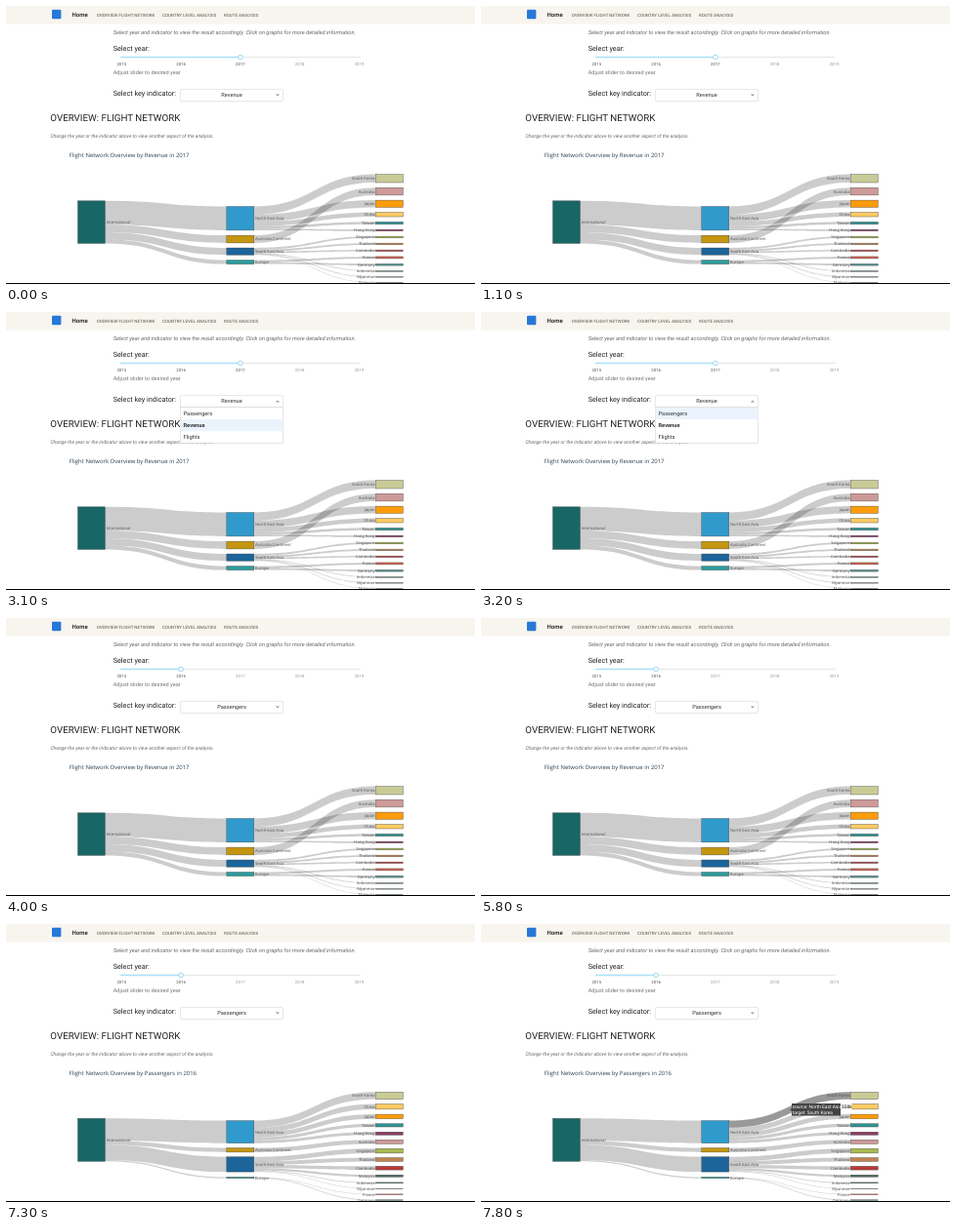
Write an HTML page that moves like this. It is 480x285 px and loops after 8000 ms.

```html
<!DOCTYPE html>
<html lang="en">
<head>
<meta charset="utf-8">
<title>Flight network</title>
<style>
  html, body { margin: 0; width: 100%; height: 100%; overflow: hidden; background: #fff; }
  svg { display: block; width: 100%; height: 100%; }
  text { font-family: Roboto, sans-serif; fill: #3a3a3a; text-rendering: geometricPrecision; white-space: pre; }
  .nav { font-size: 4.45px; font-weight: 500; fill: #77736c; }
  .head { font-size: 7.25px; fill: #222; }
  .note { font-style: italic; fill: #666; }
  .pick { font-size: 5.68px; fill: #333; }
  .year { font-size: 4.3px; text-anchor: middle; }
  .chart text { font-family: "Open Sans", sans-serif; }
  .title { font-size: 5.95px; fill: #2a3f4f; }
  .label { font-size: 4.12px; fill: #505050; }
  .tip text { font-size: 4.85px; }
</style>
</head>
<body>
<svg id="stage" viewBox="0 0 480 285" xmlns="http://www.w3.org/2000/svg">
  <rect width="480" height="285" fill="#fff"/>
  <rect width="480" height="18.6" fill="#f8f5ee"/>
  <rect x="47" y="3.8" width="9.4" height="9.4" rx="1" fill="#2878d8"/>
  <text x="67.6" y="11.3" font-size="6" font-weight="500" style="fill:#111">Home</text>
  <text class="nav" x="92.7" y="10.8">OVERVIEW FLIGHT NETWORK</text>
  <text class="nav" x="160" y="10.8">COUNTRY LEVEL ANALYSIS</text>
  <text class="nav" x="223" y="10.8">ROUTE ANALYSIS</text>

  <text class="note" x="109.7" y="28.8" font-size="5.7">Select year and indicator to view the result accordingly. Click on graphs for more detailed information.</text>
  <text class="head" x="109.7" y="45.6">Select year:</text>
  <g id="slider"></g>
  <text x="109.7" y="69.8" font-size="5.6" style="fill:#757575">Adjust slider to desired year</text>
  <text class="head" x="109.7" y="91.9">Select key indicator:</text>

  <text x="45.3" y="117.7" font-size="9.77" style="fill:#222">OVERVIEW: FLIGHT NETWORK</text>
  <text class="note" x="45.4" y="135.4" font-size="5.02">Change the year or the indicator above to view another aspect of the analysis.</text>

  <g id="charts"></g>
  <g id="select"></g>

  <g id="tip" class="tip">
    <rect x="368" y="184" width="11.5" height="6.6" fill="#fff"/>
    <path d="M318 184H368V196.6H318V191.5L316 190.3L318 189.1Z" fill="#444"/>
    <text x="318.6" y="189.2" style="fill:#fff">source: North East Asia</text>
    <text x="318.6" y="195" style="fill:#fff">target: South Korea</text>
    <text x="369" y="189.2" font-weight="500" style="fill:#333">558k</text>
  </g>
  <rect y="284" width="480" height="1" fill="#000"/>
</svg>
<script>
const LOOP = 8000;
const at = { open: 2700, hover: 3200, pick: 3400, slide: 3600, chart: 7300, tip: 7500 };
const $ = id => document.getElementById(id);

function add(parent, tag, attrs, text) {
  const el = document.createElementNS('http://www.w3.org/2000/svg', tag);
  for (const k in attrs) el.setAttribute(k, attrs[k]);
  if (text) el.textContent = text;
  parent.appendChild(el);
  return el;
}
const show = (el, on) => el.setAttribute('visibility', on ? 'visible' : 'hidden');

// Year slider
const yearX = i => 118.3 + i * 60.8;
const slider = $('slider');
add(slider, 'rect', { x: 117, y: 51.8, width: 246, height: 1.5, rx: .75, fill: '#e9e9e9' });
const track = add(slider, 'rect', { x: 117, y: 51.8, height: 1.5, rx: .75, fill: '#abe2fb' });
const knob = add(slider, 'circle', { cy: 52.5, r: 2.3, fill: '#fff', stroke: '#8fd3f4', 'stroke-width': .9 });
const years = [0, 1, 2, 3, 4].map(i =>
  add(slider, 'text', { class: 'year', x: yearX(i), y: 61 }, String(2015 + i)));

// Indicator select
const select = $('select');
add(select, 'rect', { x: 178.4, y: 85.4, width: 105.2, height: 12.2, rx: 1.4, fill: '#fff', stroke: '#ccc', 'stroke-width': .5 });
const value = add(select, 'text', { class: 'pick', x: 231, y: 93.3, 'text-anchor': 'middle' });
const arrow = add(select, 'path', { fill: '#999' });
const menu = add(select, 'g', {});
add(menu, 'rect', { x: 178.4, y: 97.6, width: 105.2, height: 36.7, fill: '#fff', stroke: '#ccc', 'stroke-width': .5 });
const glow = add(menu, 'rect', { x: 178.7, width: 104.6, height: 12.2, fill: '#ebf4fd' });
['Passengers', 'Revenue', 'Flights'].forEach((name, i) =>
  add(menu, 'text', { class: 'pick', x: 181.5, y: 105.9 + i * 12.2, 'font-weight': i === 1 ? 700 : 400 }, name));

// Sankey charts
const COLS = [73.5, 225.8, 378.3], NODE = 28;
const hubs = {
  'North East Asia': ['#2f9acb', 'South Korea,China,Japan,Taiwan,Hong Kong'],
  'Australia Continent': ['#c4950f', 'Australia'],
  'South East Asia': ['#1c649a', 'Singapore,Thailand,Cambodia,Malaysia,Indonesia,Myanmar'],
  'Europe': ['#2b9c9c', 'France,Germany']
};
const lands = {
  'South Korea': '#c9cb96', Australia: '#cd9a98', Japan: '#fd9c0a', China: '#fccb61',
  Taiwan: '#319393', 'Hong Kong': '#8b3b62', Singapore: '#a9b94f', Thailand: '#c18450',
  Cambodia: '#b93a38', France: '#d5614f', Germany: '#5b9a98', Indonesia: '#4f7a68',
  Myanmar: '#7d8f86', Malaysia: '#4e6b60'
};

function ribbon(x0, y0, h0, x1, y1, h1) {
  const m = (x0 + x1) / 2;
  return `M${x0} ${y0}C${m} ${y0} ${m} ${y1} ${x1} ${y1}V${y1 + h1}` +
    `C${m} ${y1 + h1} ${m} ${y0 + h0} ${x0} ${y0 + h0}Z`;
}

// Every node is [top, height]; countries are listed from top to bottom.
function sankey(title, root, mid, ends) {
  const g = add($('charts'), 'g', { class: 'chart' });
  add(g, 'text', { class: 'title', x: 64.8, y: 154.9 }, title);
  const links = {};
  const link = (name, col, y0, h0, [y1, h1]) => {
    links[name] = add(g, 'path', {
      d: ribbon(COLS[col] + NODE, y0, h0, COLS[col + 1], y1, h1), fill: '#000', 'fill-opacity': .2
    });
  };
  const node = (name, col, [y, h], fill) => {
    add(g, 'rect', { x: COLS[col], y, width: NODE, height: h, fill, stroke: '#444', 'stroke-width': .4 });
    const last = col === 2;
    add(g, 'text', {
      class: 'label', y: y + h / 2 + 1.45, 'text-anchor': last ? 'end' : 'start',
      x: last ? COLS[2] - .8 : COLS[col] + NODE + 1.2
    }, name);
  };
  const sum = list => list.reduce((s, [, h]) => s + h, 0);
  const names = Object.keys(hubs);

  let from = root[0];
  const k = root[1] / sum(mid);
  names.forEach((name, i) => {
    const h = mid[i][1] * k;
    link(name, 0, from, h, mid[i]);
    from += h;
    const members = Object.keys(ends).filter(n => hubs[name][1].split(',').includes(n));
    const scale = mid[i][1] / sum(members.map(n => ends[n]));
    let y = mid[i][0];
    members.forEach(n => {
      const out = ends[n][1] * scale;
      link(n, 1, y, out, ends[n]);
      y += out;
    });
  });
  node('International', 0, root, '#186766');
  names.forEach((name, i) => node(name, 1, mid[i], hubs[name][0]));
  for (const n in ends) node(n, 2, ends[n], lands[n]);
  return { g, links };
}

const revenue = sankey('Flight Network Overview by Revenue in 2017', [199.8, 43.6],
  [[205.5, 24.4], [235.1, 7.8], [248, 7.2], [260.5, 4.1]], {
    'South Korea': [172.6, 8.4], Australia: [186.2, 7.7], Japan: [199.1, 7.3], China: [211.5, 4.5],
    Taiwan: [221.3, 2.5], 'Hong Kong': [229.1, 1.6], Singapore: [236.1, 1.7], Thailand: [243.1, 1.6],
    Cambodia: [250.1, 1.4], France: [256.9, 2], Germany: [264.2, 1.9], Indonesia: [271.5, .7],
    Myanmar: [277.6, .5], Malaysia: [283.2, .5]
  });
const passengers = sankey('Flight Network Overview by Passengers in 2016', [199.3, 44],
  [[201.6, 23.1], [229.6, 4.3], [238.7, 15.4], [259.4, 1.4]], {
    'South Korea': [172.3, 7.4], China: [184.5, 5.4], Japan: [195.1, 4.6], Taiwan: [204.7, 3.3],
    'Hong Kong': [213.2, 3.1], Australia: [221.2, 4.2], Singapore: [230.3, 4.6], Thailand: [239.6, 3.8],
    Cambodia: [248.3, 3.8], Malaysia: [257.2, 2.1], Indonesia: [264.9, .9], Myanmar: [271.1, .6],
    France: [276.9, .7], Germany: [282.8, .7]
  });

function draw(t) {
  const open = t >= at.open && t < at.pick;
  const year = t < at.slide ? 2 : 1;
  track.setAttribute('width', yearX(year) - 117);
  knob.setAttribute('cx', yearX(year));
  years.forEach((el, i) => { el.style.fill = i <= year ? '#555' : '#999'; });

  value.textContent = t < at.pick ? 'Revenue' : 'Passengers';
  arrow.setAttribute('d', open ? 'M275.8 92.5h4.2l-2.1-2.1Z' : 'M275.8 90.4h4.2l-2.1 2.1Z');
  show(menu, open);
  glow.setAttribute('y', t < at.hover ? 109.9 : 97.8);
  if (!open) glow.setAttribute('visibility', 'hidden');
  else glow.removeAttribute('visibility');

  show(revenue.g, t < at.chart);
  show(passengers.g, t >= at.chart);
  show($('tip'), t >= at.tip);
  passengers.links['South Korea'].setAttribute('fill-opacity', t >= at.tip ? .4 : .2);
}

const start = performance.now();
function tick() {
  draw((performance.now() - start) % LOOP);
  requestAnimationFrame(tick);
}
tick();
</script>
</body>
</html>
```
